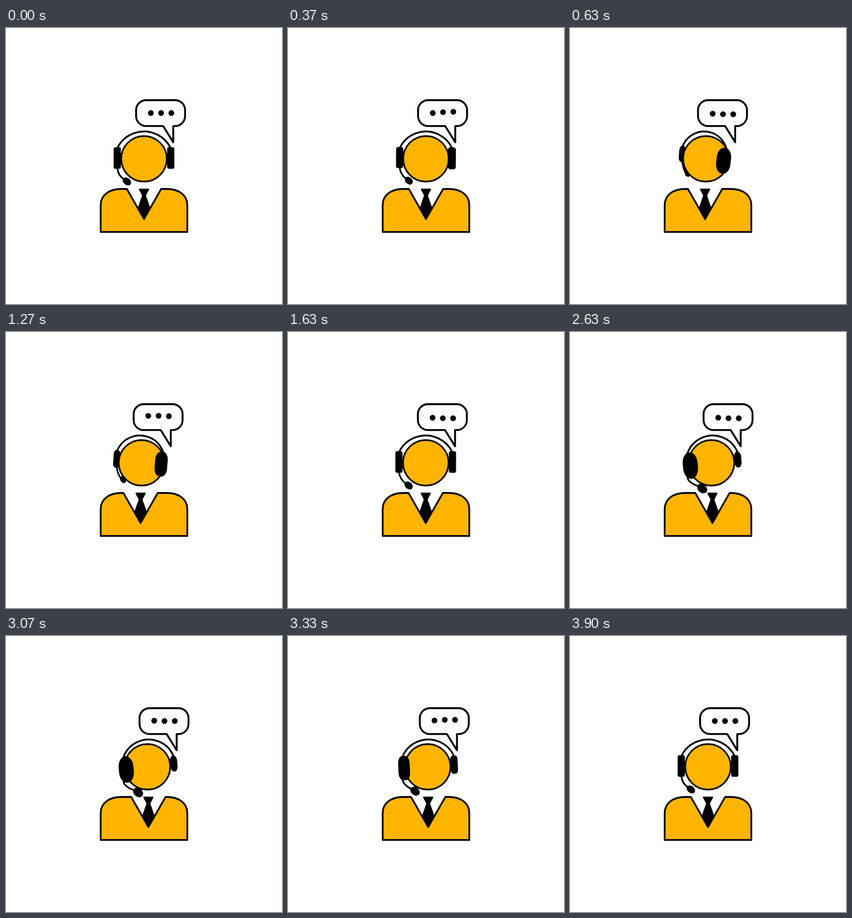
Write an HTML page with a canvas that moves like this. It is 500x500 px and loops after 4.01 s.

```html
<!DOCTYPE html>
<html lang="en">
<head>
<meta charset="utf-8">
<title>Support agent</title>
<style>
  html, body { margin: 0; width: 100%; height: 100%; overflow: hidden; background: #fff; }
  canvas { display: block; width: 500px; height: 500px; }
</style>
</head>
<body>
<canvas id="stage" width="500" height="500"></canvas>
<script>
const ctx = document.getElementById('stage').getContext('2d');
const LOOP = 4010;
const YELLOW = '#ffb400';

// Headset parts: [centre x, centre y, width, height, corner rx, corner ry, tilt]
const FRONT = {
  left: [201.5, 235.5, 13, 39, 3, 3, 0],
  right: [298.5, 235.5, 13, 39, 3, 3, 0],
  mic: [219, 278, 17, 12.5, 0, 0, 40]
};
const TURNED_LEFT = {
  left: [208.5, 228, 11.5, 30, 5.5, 9, 5],
  right: [283.5, 240.5, 26, 47, 12, 18, 6],
  mic: [218, 264, 12, 9, 0, 0, 60]
};
const TURNED_RIGHT = {
  left: [210, 242, 27, 48, 13, 20, -5],
  right: [296, 231, 13, 29, 6, 10, -5],
  mic: [231.5, 283.5, 20, 15.5, 0, 0, 40]
};

const ease = u => (1 - Math.cos(Math.PI * Math.min(1, Math.max(0, u)))) / 2;
const ramp = (t, a, b) => ease((t - a) / (b - a));
const mix = (a, b, k) => a.map((v, i) => v + (b[i] - v) * k);

// Each dot rises, dips and settles once a second, a little after its neighbour.
function dotY(t, i) {
  const u = (t % 1000 - i * 67) / 767;
  if (t >= 4000 || u <= 0 || u >= 1) return 154;
  if (u < 0.3) return 154 - 2.3 * ease(u / 0.3);
  if (u < 0.67) return 151.7 + 4.6 * ease((u - 0.3) / 0.37);
  return 156.3 - 2.3 * ease((u - 0.67) / 0.33);
}

function line(width, fill) {
  if (fill) {
    ctx.fillStyle = fill;
    ctx.fill();
  }
  ctx.lineWidth = width;
  ctx.stroke();
}

function fillBlack() {
  ctx.fillStyle = '#000';
  ctx.fill();
}

function pad([x, y, w, h, rx, ry, tilt], dx) {
  ctx.save();
  ctx.translate(x + dx, y);
  ctx.rotate(tilt * Math.PI / 180);
  ctx.beginPath();
  ctx.roundRect(-w / 2, -h / 2, w, h, { x: rx, y: ry });
  fillBlack();
  ctx.restore();
}

function micTip([x, y, w, h, , , tilt], dx) {
  ctx.beginPath();
  ctx.ellipse(x + dx, y, w / 2, h / 2, tilt * Math.PI / 180, 0, 7);
  fillBlack();
}

function drawBody(dx) {
  const x = 250 + dx;
  ctx.beginPath();
  ctx.moveTo(171.5, 369.5);
  ctx.lineTo(171.5, 321);
  ctx.bezierCurveTo(171.5, 303, 187, 291.7, 208, 291.7);
  ctx.lineTo(x - 31, 291.7);
  ctx.lineTo(x, 346);
  ctx.lineTo(x + 31, 291.7);
  ctx.lineTo(292, 291.7);
  ctx.bezierCurveTo(313, 291.7, 328.5, 303, 328.5, 321);
  ctx.lineTo(328.5, 369.5);
  ctx.closePath();
  line(3.2, YELLOW);

  const tie = [[-9, 291], [9, 291], [9, 293], [3.5, 303.5], [11, 325], [0, 346],
    [-11, 325], [-3.5, 303.5], [-9, 293]];
  ctx.beginPath();
  tie.forEach(([px, py]) => ctx.lineTo(x + px, py));
  ctx.closePath();
  fillBlack();
}

function drawBubble(dx, t) {
  ctx.save();
  ctx.translate(dx, 0);
  ctx.beginPath();
  ctx.moveTo(254, 130.7);
  ctx.arcTo(324.4, 130.7, 324.4, 160, 18);
  ctx.arcTo(324.4, 177.6, 303, 177.6, 18);
  ctx.lineTo(303, 177.6);
  ctx.lineTo(303, 207);
  ctx.lineTo(284.8, 177.6);
  ctx.arcTo(235.7, 177.6, 235.7, 150, 18);
  ctx.arcTo(235.7, 130.7, 254, 130.7, 18);
  ctx.closePath();
  line(3.4, '#fff');
  for (let i = 0; i < 3; i++) {
    ctx.beginPath();
    ctx.arc(262.3 + 18.6 * i, dotY(t, i), 5.2, 0, 7);
    fillBlack();
  }
  ctx.restore();
}

function drawHead(headX, setX, { left, right, mic }, facing) {
  // The band meets a wide, near pad towards its outer side.
  const outer = p => Math.max(0, p[2] - 13) * 0.36;
  const x0 = left[0] + setX - outer(left);
  const x1 = right[0] + setX + outer(right);
  const base = (left[1] - left[3] / 2 + right[1] - right[3] / 2) / 2 + 2;
  const half = (x1 - x0) / 2, rise = base - 187.5;
  const radius = (half * half + rise * rise) / (2 * rise);
  const sweep = Math.asin(half / radius);

  ctx.beginPath();
  ctx.arc((x0 + x1) / 2, 187.5 + radius, radius, -Math.PI / 2 - sweep, -Math.PI / 2 + sweep);
  line(3.2);

  ctx.beginPath();
  ctx.moveTo(x0, left[1] + left[3] / 2 - 2);
  ctx.quadraticCurveTo(x0 + 1.5, mic[1] - 10, mic[0] + setX - 4, mic[1] - 3);
  line(3);
  micTip(mic, setX);

  if (facing <= 0) pad(left, setX);
  if (facing >= 0) pad(right, setX);
  ctx.beginPath();
  ctx.arc(250 + headX, 237, 41.3, 0, 7);
  line(3, YELLOW);
  if (facing > 0) pad(left, setX);
  if (facing < 0) pad(right, setX);
}

function draw(t) {
  const goLeft = ramp(t, 350, 780) - ramp(t, 1120, 1740);
  const goRight = ramp(t, 1960, 2700) - ramp(t, 3000, 3650);
  const turnLeft = ramp(t, 300, 640) - ramp(t, 1080, 1650);
  const turnRight = ramp(t, 1900, 2600) - ramp(t, 3030, 3690);
  const headX = 6.4 * goRight - 5.2 * goLeft;
  const setX = 8.2 * goRight - 7.2 * goLeft;
  const facing = turnRight - turnLeft;
  const pose = facing < 0 ? TURNED_LEFT : TURNED_RIGHT;
  const parts = {};
  for (const k in FRONT) parts[k] = mix(FRONT[k], pose[k], Math.abs(facing));

  ctx.fillStyle = '#fff';
  ctx.fillRect(0, 0, 500, 500);
  ctx.strokeStyle = '#000';
  ctx.lineJoin = 'round';
  ctx.lineCap = 'round';
  drawBody(setX);
  drawHead(headX, setX, parts, facing);
  drawBubble(headX, t);
}

const start = performance.now();
function tick() {
  draw((performance.now() - start) % LOOP);
  requestAnimationFrame(tick);
}
tick();
</script>
</body>
</html>
```
